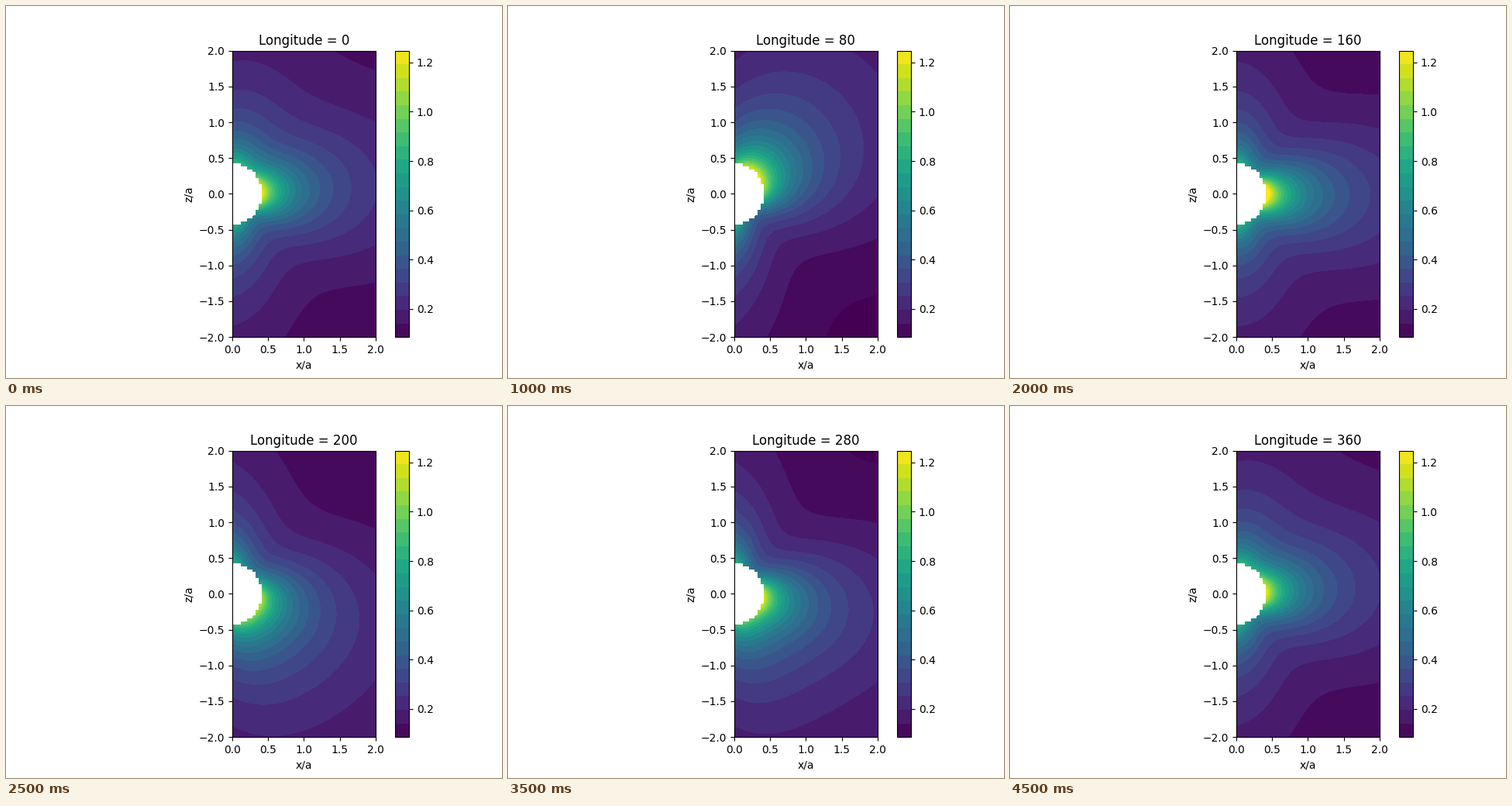
A matplotlib script for the animation above (5000 ms loop, 640 px wide and 480 px high).

```python
import numpy as np
import matplotlib.pyplot as plt
from matplotlib.animation import FuncAnimation

STEP = 40                       # degrees of longitude per frame
COUNT = 10
INNER = 0.401                   # radius of the masked core
LEVELS = np.linspace(0.085, 1.2483, 22)

x, z = np.meshgrid(np.linspace(0, 2, 49), np.linspace(-2, 2, 98))
radius = np.hypot(x, z)
lat = np.arctan2(z, x)


def field(lon):
    """A 1/r field: an equatorial ridge plus a tilt between hemispheres."""
    ridge = 0.11 - 0.12 * np.cos(2 * np.radians(lon - 54))
    turn = np.radians(lon - 60)
    tilt = 0.153 * np.cos(turn) + 0.032 * np.cos(3 * turn)
    strength = (0.36
                + ridge * np.cos(lat) ** 2 * (1 - 3.3 * np.sin(lat) ** 2)
                + tilt * np.sin(2 * lat))
    return np.ma.masked_where(radius < INNER, strength / radius)


def contours(lon, extend="both"):
    return ax.contourf(x, z, field(lon), levels=LEVELS, cmap="viridis",
                       extend=extend, corner_mask=False)


fig, ax = plt.subplots(figsize=(6.4, 4.8), dpi=100)
ax.set(xlim=(0, 2), ylim=(-2, 2), xlabel="x/a", ylabel="z/a", aspect="equal",
       xticks=np.arange(0, 2.1, 0.5), yticks=np.arange(-2, 2.1, 0.5))
shown = contours(0, extend="neither")
bar = fig.colorbar(shown, ax=ax, ticks=np.arange(0.2, 1.3, 0.2), format="%.1f")
bar.minorticks_off()


def update(i):
    global shown
    shown.remove()
    shown = contours(i * STEP)
    ax.set_title(f"Longitude = {i * STEP}", pad=5.4)
    return []


anim = FuncAnimation(fig, update, frames=COUNT, interval=500, repeat=True,
                     repeat_delay=0, blit=False)
plt.show()
```
